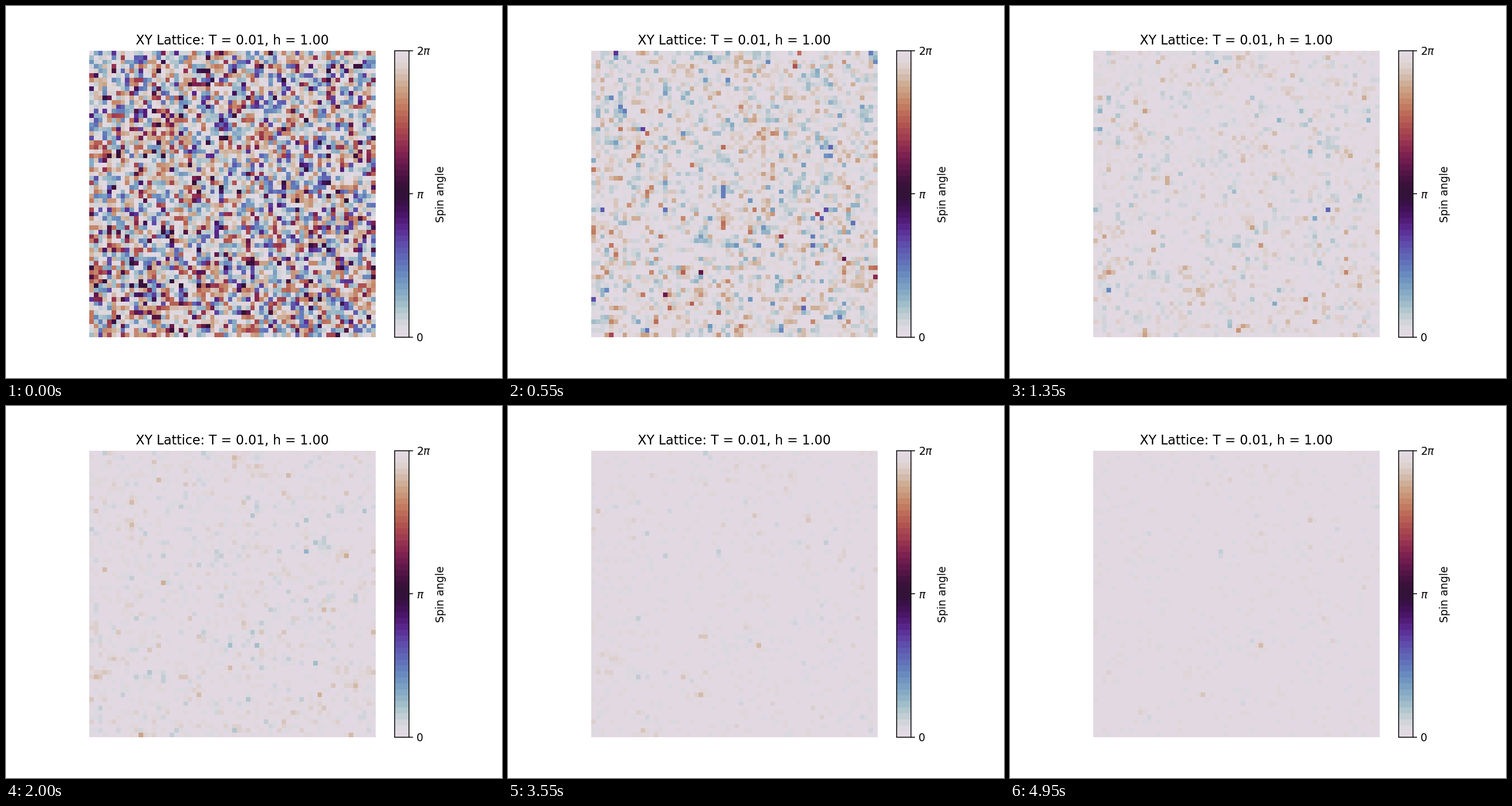
A matplotlib script that plays this animation: 864 by 648 pixels, repeating every 5 s.

```python
import math
import random
from itertools import accumulate

import numpy as np
import matplotlib.pyplot as plt
from matplotlib.animation import FuncAnimation

N = 64
SITES = N * N
FRAMES = 100
WARMUP = 2
TEMP, FIELD, COUPLING = 0.01, 1.0, 0.35
BANDS = 48
TAU = 2 * math.pi


def neighbours(site):
    row, col = divmod(site, N)
    return (row * N + (col - 1) % N, row * N + (col + 1) % N,
            (site - N) % SITES, (site + N) % SITES)


def simulate():
    """Metropolis sweeps over random sites with uniform trial angles."""
    rng = random.Random(7)
    angles = [rng.random() * TAU for _ in range(SITES)]
    cx = [math.cos(a) for a in angles]
    sy = [math.sin(a) for a in angles]
    near = [neighbours(i) for i in range(SITES)]

    # Some sites are tried less often, so stray spins linger
    pace = list(accumulate(rng.uniform(0.4, 1.6) for _ in range(SITES)))

    def sweep():
        for i in rng.choices(range(SITES), cum_weights=pace, k=SITES):
            left, right, up, down = near[i]
            hx = FIELD + COUPLING * (cx[left] + cx[right] + cx[up] + cx[down])
            hy = COUPLING * (sy[left] + sy[right] + sy[up] + sy[down])
            trial = rng.random() * TAU
            c, s = math.cos(trial), math.sin(trial)
            cost = hx * (cx[i] - c) + hy * (sy[i] - s)
            if cost <= 0 or rng.random() < math.exp(-cost / TEMP):
                angles[i], cx[i], sy[i] = trial, c, s

    states = []
    for step in range(WARMUP + FRAMES):
        if step >= WARMUP:
            states.append(np.reshape(angles, (N, N)))
        sweep()
    return states


states = simulate()

fig, ax = plt.subplots(figsize=(6.4, 4.8), dpi=135)
cmap = plt.get_cmap("twilight").resampled(BANDS)
image = ax.imshow(states[0], cmap=cmap, vmin=0, vmax=TAU,
                  interpolation="nearest")
ax.set_title(f"XY Lattice: T = {TEMP:.2f}, h = {FIELD:.2f}")
ax.axis("off")

bar = fig.colorbar(image, ax=ax, label="Spin angle")
bar.set_ticks([0, math.pi, TAU], labels=["0", r"$\pi$", r"$2\pi$"])


def update(frame):
    image.set_data(states[frame])
    return [image]


anim = FuncAnimation(fig, update, frames=FRAMES, interval=50, repeat=True)
plt.show()
```
